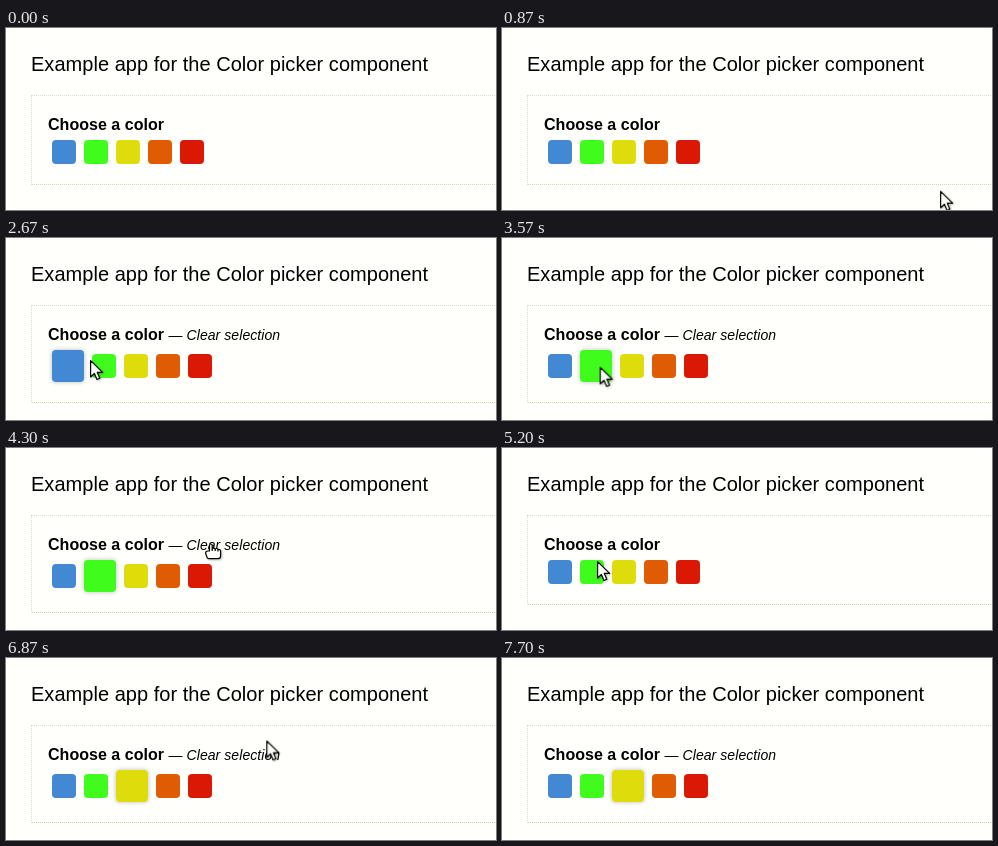
These frames come from a looping animation (490 px wide and 182 px high, 7910 ms). An HTML page:

```html
<!DOCTYPE html>
<html lang="en">
<head>
<meta charset="utf-8">
<title>Color picker</title>
<style>
html, body { margin: 0; width: 100%; height: 100%; overflow: hidden; }
body {
  position: relative;
  background: #fffffb;
  color: #000;
  font-family: "Liberation Sans", Arial, sans-serif;
}
h1 {
  position: absolute; left: 25px; top: 25px; margin: 0;
  font-size: 20px; line-height: 22px; font-weight: 400; white-space: nowrap;
  letter-spacing: .032px;
}
.box {
  position: absolute; left: 25px; top: 67px; width: 480px;
  padding: 44px 20px 20px;
  border: 1px dotted #dcdccc;
  border-bottom-color: #d6d6a4;
}
.label {
  position: absolute; left: 16px; top: 20px;
  font-size: 16px; line-height: 18px; white-space: nowrap;
  letter-spacing: .03px;
}
.clear { font-size: 14px; line-height: 1; letter-spacing: .07px; }
.row { display: flex; align-items: center; gap: 8px; }
.row i { width: 24px; height: 24px; border-radius: 4px; background: var(--c); }
.cursor { position: absolute; left: 0; top: 0; overflow: visible; filter: drop-shadow(1px 1px 1px #0004); }
.cursor path { fill: #fffffa; stroke: #000; stroke-width: 1.2; stroke-linejoin: round; }

/* Selection states */
.clear, .row i, .arrow, .hand { animation: 7.91s step-end infinite; }
.clear { animation-name: clear; }
.row .blue { animation-name: blue; }
.row .green { animation-name: green; }
.row .yellow { animation-name: yellow; }

@keyframes clear {
  0%, 58.15% { visibility: hidden; }
  25.28%, 73.96%, to { visibility: visible; }
}
@keyframes blue {
  0%, 37.93%, to { width: 24px; height: 24px; box-shadow: none; }
  25.28% { width: 32px; height: 32px; box-shadow: 0 0 5px #0004; }
}
@keyframes green {
  0%, 58.15%, to { width: 24px; height: 24px; box-shadow: none; }
  37.93% { width: 32px; height: 32px; box-shadow: 0 0 5px #0004; }
}
@keyframes yellow {
  0% { width: 24px; height: 24px; box-shadow: none; }
  73.96%, to { width: 32px; height: 32px; box-shadow: 0 0 5px #0004; }
}

/* Pointer path and shape */
.cursor { animation: move 7.91s ease-in-out infinite; }
.arrow { animation-name: arrow; }
.hand { animation-name: hand; }

@keyframes move {
  0%, 6.32% { transform: translate(470px, 184px); }
  10.49% { transform: translate(440px, 163px); }
  20.61% { transform: translate(59px, 126px); }
  30.34% { transform: translate(60px, 126px); }
  33.75% { transform: translate(84px, 122px); }
  36.66% { transform: translate(93px, 122px); }
  42.98% { transform: translate(95px, 130px); }
  50.95% { transform: translate(112px, 122px); }
  54.36%, 58.15% { transform: translate(205px, 95px); }
  65.74%, 68.65% { transform: translate(95px, 113px); }
  73.32%, 78.76% { transform: translate(131px, 122px); }
  88.5% { transform: translate(268px, 80px); }
  89.38% { transform: translate(380px, 91px); animation-timing-function: step-end; }
  92.67%, to { transform: translate(470px, 184px); }
}
@keyframes arrow {
  0%, 58.15%, 85.5%, to { visibility: visible; }
  53.3%, 83.3% { visibility: hidden; }
}
@keyframes hand {
  0%, 58.15%, 85.5%, to { visibility: hidden; }
  53.3%, 83.3% { visibility: visible; }
}
</style>
</head>
<body>
<h1>Example app for the Color picker component</h1>
<div class="box">
  <div class="label"><b>Choose a color</b> <span class="clear">— <em>Clear selection</em></span></div>
  <div class="row">
    <i class="blue" style="--c:#4288d2"></i>
    <i class="green" style="--c:#40fc1c"></i>
    <i class="yellow" style="--c:#dfdc0c"></i>
    <i style="--c:#df5c04"></i>
    <i style="--c:#db1804"></i>
  </div>
</div>
<svg class="cursor" width="16" height="20">
  <path class="arrow" d="M.6.6V17L4.4 13.5l2.6 6 2.8-1.2L7.3 12.4H12.6Z"/>
  <g class="hand">
    <path d="M-1.5 8V2.5Q-1.5 1-.2 1T1.2 2.5V5.5Q3 4.6 4.2 5.8 6 5 7 6.4 9.6 6 9.6 8.5V13Q9.6 15.6 7 15.6H-2Q-4 15.6-4.2 13.5L-5.4 10.3Q-5.4 8-3 8Z"/>
    <path d="M1.2 5.5V8M4.2 5.8V8M7 6.4V8.5"/>
  </g>
</svg>
</body>
</html>
```
